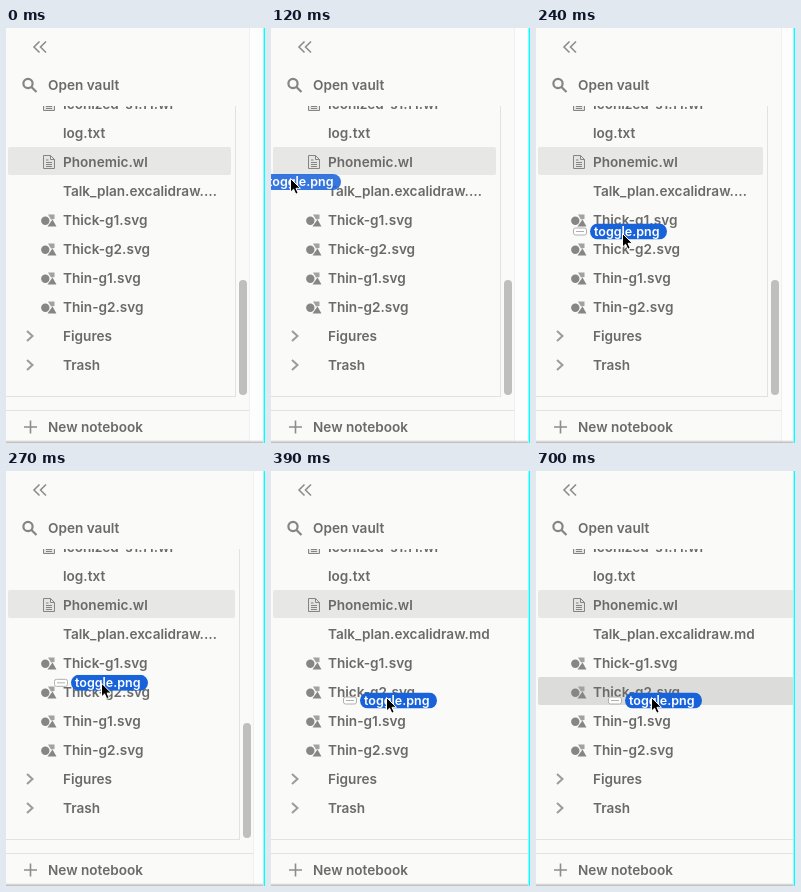
An HTML page that plays this animation: 259x415 px, repeating every 760 ms.

```html
<!DOCTYPE html>
<html lang="en">
<head>
<meta charset="utf-8">
<title>File drag</title>
<style>
  html, body { margin: 0; width: 100%; height: 100%; overflow: hidden; background: #fdfdfd; }
  body { position: relative; color: #6a6a69; font: 600 13.6px/29px Inter, sans-serif; white-space: nowrap; }
  svg { fill: none; stroke: #8d8d8c; stroke-width: 1.6; overflow: visible; }
  .app, .list, .thumb, .edge, .floor, .drag, .cursor, .bar, .icons, .row svg, .row::before { position: absolute; box-sizing: border-box; }

  .app { left: 0; top: 0; width: 244px; height: 415px; background: #fafaf8; border-right: 1px solid #f0f0ef; animation: widen 760ms infinite; }
  .icons { left: 0; top: 0; }
  .bar { left: 42px; }
  .foot { left: 0; right: 0; top: 382px; height: 1px; background: #e2e2e1; }
  .list { left: 0; right: 13px; top: 78px; height: 291px; overflow: hidden; border: solid #e2e2e1; border-width: 0 1px 1px 0; }
  .rows { margin-top: -16px; }
  .row { position: relative; height: 29px; padding: 0 16px 0 57px; }
  .row > * { position: relative; }
  .row span { display: block; overflow: hidden; text-overflow: ellipsis; }
  .row svg { left: 35px; top: 6px; width: 16px; height: 16px; }
  .row::before { left: 2px; right: 4px; top: -1px; height: 28px; border-radius: 2px; }
  .picked::before { content: ""; background: #e7e7e6; }
  .target::before { content: ""; background: #dcdcdb; animation: hover 760ms infinite; }
  .thumb { right: 2px; top: 252px; width: 8px; height: 115px; border-radius: 4px; background: #bfbfbe; }
  .edge { left: 257px; top: 0; width: 2px; height: 415px; background: linear-gradient(90deg, #8ffdfd 1px, #0ff 1px); }
  .floor { left: 0; top: 412px; width: 257px; height: 3px; background: linear-gradient(#b4b4b300, #b4b4b3); }

  .drag { left: 0; top: -8px; width: 77px; height: 16px; padding-left: 4px; border-radius: 8px; background: #1862da; color: #fff; font-size: 12.5px; line-height: 16px; animation: carry 760ms infinite; }
  .drag svg { position: absolute; left: -17px; top: 4px; stroke: #b0b0af; stroke-width: 1; }
  .cursor { left: 0; top: 0; animation: point 760ms infinite; }

  @keyframes widen {
    0%, 23.684% { width: 244px; animation-timing-function: steps(2); }
    31.579% { width: 246px; animation-timing-function: steps(3); }
    43.421% { width: 251px; animation-timing-function: steps(2); }
    51.316%, 100% { width: 278px; }
  }
  @keyframes carry {
    0% { transform: translate(-83px, 106px); opacity: .85; animation-timing-function: steps(4); }
    15.789% { transform: translate(-7px, 154px); opacity: .87; animation-timing-function: steps(2); }
    23.684% { transform: translate(26px, 178px); opacity: .96; animation-timing-function: steps(2); }
    31.579% { transform: translate(54px, 203.5px); opacity: 1; animation-timing-function: steps(3); }
    43.421% { transform: translate(87px, 228.5px); animation-timing-function: steps(2); }
    51.316%, 100% { transform: translate(89px, 229.5px); opacity: 1; }
  }
  @keyframes point {
    0% { transform: translate(-62px, 98px); animation-timing-function: steps(4); }
    15.789% { transform: translate(19px, 150px); animation-timing-function: steps(2); }
    23.684% { transform: translate(57px, 179px); animation-timing-function: steps(2); }
    31.579% { transform: translate(86px, 205px); animation-timing-function: steps(3); }
    43.421% { transform: translate(113px, 225px); animation-timing-function: steps(2); }
    51.316%, 100% { transform: translate(115px, 226px); }
  }
  @keyframes hover {
    0%, 84.2% { opacity: 0; animation-timing-function: step-end; }
    84.21% { opacity: .4; animation-timing-function: steps(2); }
    92.105%, 100% { opacity: 1; }
  }
</style>
</head>
<body>
<svg width="0" height="0" style="position:absolute">
  <defs>
    <path id="doc" d="M2.5 1.5h7l4 4v9h-11z M9.5 1.5v4h4 M5 6h2.5 M5 8.5h6 M5 10.5h6 M5 12.5h6" fill="#e4e4e3" stroke="#858584" stroke-width="1"/>
    <g id="shapes" fill="#868685" stroke="none">
      <circle cx="4.3" cy="8.8" r="4.2"/>
      <path d="M7 2.5h6.5v4.5l-3.5 .5z" fill="#a2a2a1"/>
      <path d="M6.5 14.5 11.5 7.5 15.5 14.5z"/>
    </g>
    <path id="chevron" d="M-14 3l5.5 5-5.5 5" stroke="#9b9b9a" stroke-width="2"/>
  </defs>
</svg>

<div class="app">
  <svg class="icons" width="50" height="415">
    <path d="M33.5 13.5l-5.5 5.5 5.5 5.5M40 13.5l-5.5 5.5 5.5 5.5"/>
    <g stroke="#858584" stroke-width="2.2"><circle cx="22" cy="55.5" r="4.6"/><path d="M25.5 59l5 5"/></g>
    <path d="M18 399h13M24.5 392.5v13"/>
  </svg>
  <div class="bar" style="top:43px">Open vault</div>
  <div class="list"><div class="rows">
    <div class="row"><svg><use href="#doc"/></svg><span>Iconized-s1.f1.wl</span></div>
    <div class="row"><span>log.txt</span></div>
    <div class="row picked"><svg><use href="#doc"/></svg><span>Phonemic.wl</span></div>
    <div class="row"><span>Talk_plan.excalidraw.md</span></div>
    <div class="row"><svg><use href="#shapes"/></svg><span>Thick-g1.svg</span></div>
    <div class="row target"><svg><use href="#shapes"/></svg><span>Thick-g2.svg</span></div>
    <div class="row"><svg><use href="#shapes"/></svg><span>Thin-g1.svg</span></div>
    <div class="row"><svg><use href="#shapes"/></svg><span>Thin-g2.svg</span></div>
    <div class="row"><svg><use href="#chevron"/></svg><span>Figures</span></div>
    <div class="row"><svg><use href="#chevron"/></svg><span>Trash</span></div>
  </div></div>
  <div class="thumb"></div>
  <div class="bar foot"></div>
  <div class="bar" style="top:385px">New notebook</div>
</div>
<div class="floor"></div>

<div class="drag">
  <svg width="14" height="8"><rect x=".5" y=".5" width="13" height="7" rx="2" fill="#fff"/><path d="M3 4h8"/></svg>
  toggle.png
</div>
<svg class="cursor" width="12" height="18">
  <path d="M.5.5v13.6l3.1-2.9 2.2 5 2.4-1-2.2-4.9h4.4z" fill="#000" stroke="#fff" stroke-width="1"/>
</svg>
<div class="edge"></div>
</body>
</html>
```
